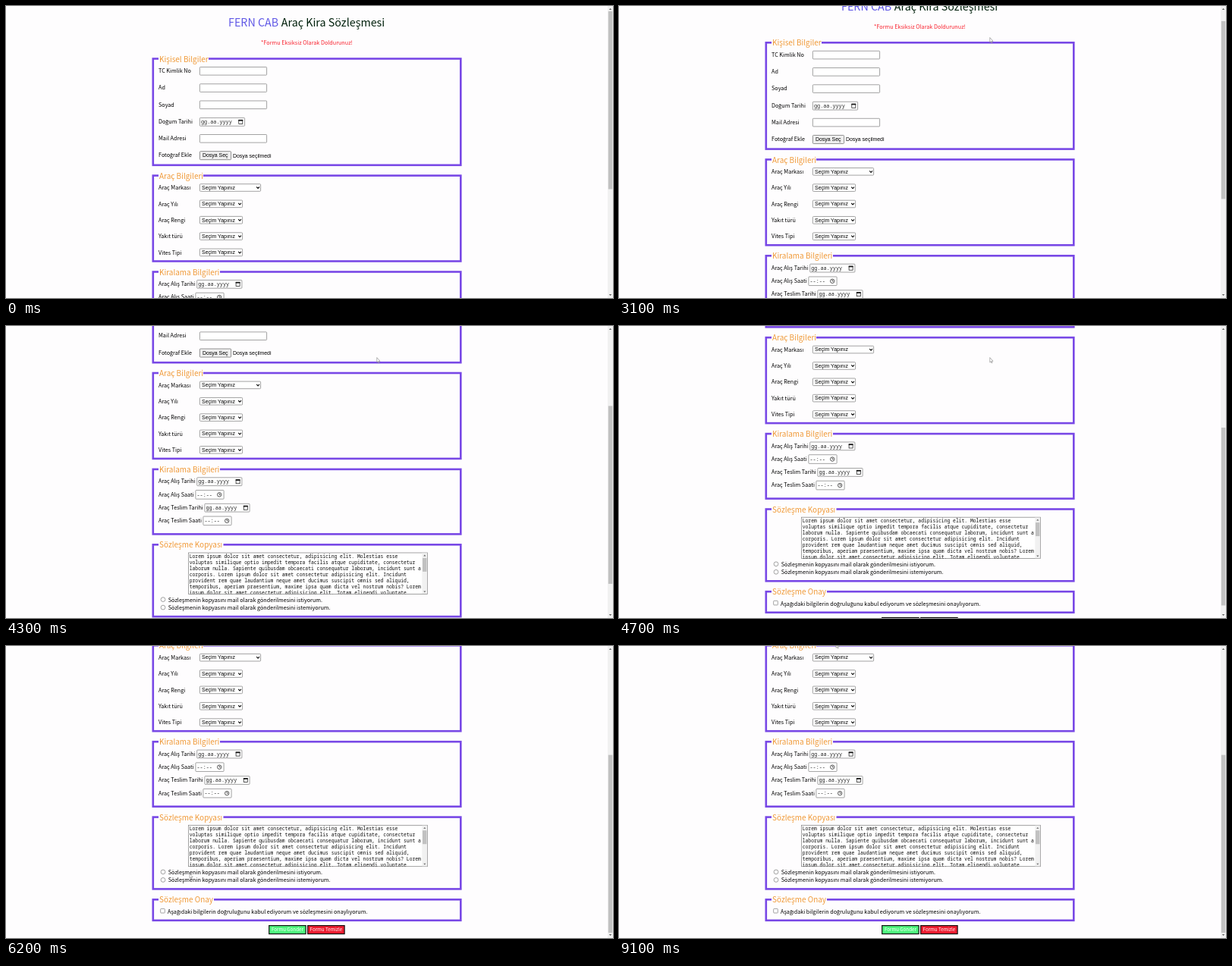
An HTML page that plays this animation: 800 by 385 pixels, repeating every 9.2 s.

```html
<!DOCTYPE html>
<html lang="tr">
<head>
<meta charset="utf-8">
<title>Araç Kira Sözleşmesi</title>
<style>
  html, body { margin: 0; width: 100%; height: 100%; overflow: hidden; background: #fefdfe; }
  svg { display: block; width: 100%; height: 100%; }
  text { font: 7.23px "Noto Sans CJK JP", "Noto Sans CJK SC", "Noto Sans CJK", "Open Sans", sans-serif; white-space: pre; }
  .title { font-size: 14.3px; }
  .legend { font-size: 9.97px; fill: #f09a38; }
  .button { font-size: 6.2px; font-weight: 500; fill: #fff; }
  .control { font: 6.94px "Liberation Sans", Arial, sans-serif; }
  .date { font: 6.8px "Noto Sans Mono", monospace; fill: #222; }
  .area { font: 6.37px "Noto Sans Mono", monospace; fill: #111; }
  .box { fill: #fff; stroke: #858585; stroke-width: .75; }
  .icon { fill: none; stroke: #111; stroke-width: .7; }
  .chevron { fill: none; stroke: #111; stroke-width: 1.15; }
</style>
</head>
<body>
<svg viewBox="0 0 800 385">
  <clipPath id="areaClip"><rect x="240.5" y="460.8" width="307.5" height="54"/></clipPath>
  <g id="page"></g>
  <rect x="793" width="7" height="385" fill="#f1f1f1"/>
  <path d="M794.8 5l1.7-2 1.7 2zM794.8 380l1.7 2 1.7-2z" fill="#606060"/>
  <rect id="thumb" x="793.8" width="5.4" height="234.5" fill="#c1c1c1"/>
  <path id="cursor" d="M0 0V6.4L1.4 5.1 2.3 7.2 3.2 6.8 2.3 4.7H4.2Z" fill="#fff" stroke="#666" stroke-width=".5"/>
</svg>
<script>
const LOOP = 9200, STEP = 100;
const PAGE_HEIGHT = 609, TRACK_TOP = 7, TRACK = 371;
const $ = id => document.getElementById(id);

const text = (x, y, str, cls = '', extra = '') =>
  `<text x="${x}" y="${y}" class="${cls}" ${extra}>${str}</text>`;
const rect = (x, y, w, h, attrs) =>
  `<rect x="${x}" y="${y}" width="${w}" height="${h}" ${attrs}/>`;
const box = (x, y, w, h, radius = .8) => rect(x, y, w, h, `rx="${radius}" class="box"`);
const label = (y, str, x = 201) => text(x, y + 2.7, str);

function fieldset(top, bottom, title, gapEnd) {
  return rect(193.8, top, 405.5, bottom - top, 'fill="none" stroke="#7848e6" stroke-width="2.6"') +
    rect(201, top - 2, gapEnd - 201, 4, 'fill="#fefdfe"') +
    text(202, top + 4.2, title, 'legend');
}

function select(y, width) {
  const x = 255 + width - 5.8;
  return box(255.4, y - 4.8, width - .8, 9.6, 1) +
    text(258, y + 2.3, 'Seçim Yapınız', 'control') +
    `<path class="chevron" d="M${x} ${y - 1}l1.9 2 1.9-2"/>`;
}

function dateInput(x, y) {
  return box(x + .4, y - 5.3, 59.2, 10.8) +
    text(x + 2, y + 2.3, 'gg.aa.yyyy', 'date') +
    rect(x + 51.8, y - 2.2, 5, 4.9, 'class="icon"') +
    rect(x + 51.4, y - 2.9, 5.8, 1.7, 'fill="#111"');
}

function timeInput(x, y) {
  return box(x + .4, y - 5.8, 37.2, 11.6) +
    text(x + 2, y + 2.2, '--:--', 'date') +
    `<circle class="icon" cx="${x + 31.7}" cy="${y}" r="2.7"/>` +
    `<path class="icon" d="M${x + 31.7} ${y - 1.8}v1.9h1.5"/>`;
}

function button(x, str, fill) {
  return rect(x + .7, 592.9, 48.4, 11, `fill="${fill}" stroke="#111" stroke-width="1.2"`) +
    text(x + 24.9, 600.7, str, 'button', 'text-anchor="middle"');
}

function header() {
  return text(293, 27.3, 'FERN CAB', 'title', 'fill="#6058e6"') +
    text(362.8, 27.3, 'Araç Kira Sözleşmesi', 'title', 'fill="#00200c"') +
    text(396.5, 51.4, '*Formu Eksiksiz Olarak Doldurunuz!', '', 'text-anchor="middle" fill="#f8202c"');
}

function personal() {
  const names = ['TC Kimlik No', 'Ad', 'Soyad', 'Doğum Tarihi', 'Mail Adresi', 'Fotoğraf Ekle'];
  return fieldset(69.5, 209.8, 'Kişisel Bilgiler', 267) + names.map((name, i) => {
    const y = 85.4 + i * 22.25;
    const field = i === 3 ? dateInput(255, y + .6)
      : i < 5 ? box(255.4, y - 4.9, 88.2, 10.6)
      : rect(255.4, y - 5, 41.2, 11, 'rx="1" fill="#efefef" stroke="#767676" stroke-width=".8"') +
        text(259, y + 2.7, 'Dosya Seç', 'control') + text(299, y + 2.9, 'Dosya seçilmedi', 'control');
    return label(y, name) + field;
  }).join('');
}

function car() {
  const names = ['Araç Markası', 'Araç Yılı', 'Araç Rengi', 'Yakıt türü', 'Vites Tipi'];
  return fieldset(223.6, 336.5, 'Araç Bilgileri', 260) + names.map((name, i) => {
    const y = 239.5 + i * 21.35;
    return label(y, name) + select(y, i ? 57 : 81);
  }).join('');
}

function rental() {
  const rows = [['Araç Alış Tarihi', dateInput, 251.3], ['Araç Alış Saati', timeInput, 249.5],
    ['Araç Teslim Tarihi', dateInput, 261.5], ['Araç Teslim Saati', timeInput, 259.5]];
  return fieldset(350.5, 436, 'Kiralama Bilgileri', 282) + rows.map(([name, input, x], i) => {
    const y = 366.4 + i * 17.25;
    return label(y, name) + input(x, y + .3);
  }).join('');
}

function agreement() {
  const lines = [
    'Lorem ipsum dolor sit amet consectetur, adipisicing elit. Molestias esse',
    'voluptas similique optio impedit tempora facilis atque cupiditate, consectetur',
    'laborum nulla. Sapiente quibusdam obcaecati consequatur laborum, incidunt sunt a',
    'corporis. Lorem ipsum dolor sit amet consectetur adipisicing elit. Incidunt',
    'provident rem quae laudantium neque amet ducimus suscipit omnis sed aliquid,',
    'temporibus, aperiam praesentium, maxime ipsa quam dicta vel nostrum nobis? Lorem',
    'ipsum dolor sit amet consectetur adipisicing elit. Totam eligendi voluptate'];
  const radios = ['istiyorum', 'istemiyorum'].map((verb, i) => {
    const y = 522.5 + i * 10.5;
    return `<circle cx="207" cy="${y - .3}" r="2.9" class="box"/>` +
      label(y, `Sözleşmenin kopyasını mail olarak gönderilmesini ${verb}.`, 213.8);
  });
  return fieldset(449.9, 544.7, 'Sözleşme Kopyası', 286.5) + box(240.4, 460.6, 315, 54.4, 0) +
    `<g clip-path="url(#areaClip)">${lines.map((line, i) => text(241.7, 467.8 + i * 8, line, 'area')).join('')}</g>` +
    rect(548.3, 461, 6.8, 53.6, 'fill="#f1f1f1"') + rect(549, 467.5, 5.4, 18, 'fill="#c1c1c1"') +
    '<path d="M550.2 465l1.6-1.8 1.6 1.8zM550.2 511l1.6 1.8 1.6-1.8z" fill="#606060"/>' + radios.join('');
}

function approval() {
  return fieldset(558.6, 586.1, 'Sözleşme Onay', 274) + box(203.7, 570.7, 5.6, 5.6) +
    label(574.4, 'Aşağıdaki bilgilerin doğruluğunu kabul ediyorum ve sözleşmesini onaylıyorum.', 213) +
    button(346, 'Formu Gönder', '#4df57d') + button(397, 'Formu Temizle', '#ee1c30');
}

$('page').innerHTML = [header, personal, car, rental, agreement, approval].map(part => part()).join('');

// Keys are [time, value...]; values between keys are linear.
const scrollKeys = [[0, 0], [3000, 0], [3100, 21.2], [3200, 41.7], [3400, 41.7], [3500, 52], [3600, 68],
  [3700, 79], [3800, 83.4], [4000, 125], [4100, 125], [4200, 145], [4300, 161.6], [4400, 167],
  [4600, 204], [4700, 208.4], [4800, 208.4], [4900, 215], [5000, 223], [5100, 224.3]];
const cursorKeys = [[1600, 540, 150], [2500, 488.8, 41.6], [5300, 488.8, 41.6], [6200, 242, 300],
  [6700, 206, 349], [7200, 362, 373], [7800, 416, 373], [8300, 410, 372], [9100, 286, -4]];

function at(keys, t) {
  const i = keys.findIndex(key => key[0] > t);
  if (i < 0) return keys[keys.length - 1].slice(1);
  if (i === 0) return keys[0].slice(1);
  const a = keys[i - 1], b = keys[i], k = (t - a[0]) / (b[0] - a[0]);
  return a.slice(1).map((v, n) => v + (b[n + 1] - v) * k);
}

function draw(now) {
  const t = Math.floor((now % LOOP) / STEP) * STEP;
  const [scroll] = at(scrollKeys, t);
  const [x, y] = at(cursorKeys, t);
  $('page').setAttribute('transform', `translate(0 ${-scroll})`);
  $('thumb').setAttribute('y', TRACK_TOP + scroll * TRACK / PAGE_HEIGHT);
  $('cursor').setAttribute('transform', `translate(${x} ${y})`);
  $('cursor').setAttribute('visibility', t < cursorKeys[0][0] ? 'hidden' : 'visible');
}

const start = performance.now();
function tick() {
  draw(performance.now() - start);
  requestAnimationFrame(tick);
}
tick();
</script>
</body>
</html>
```
